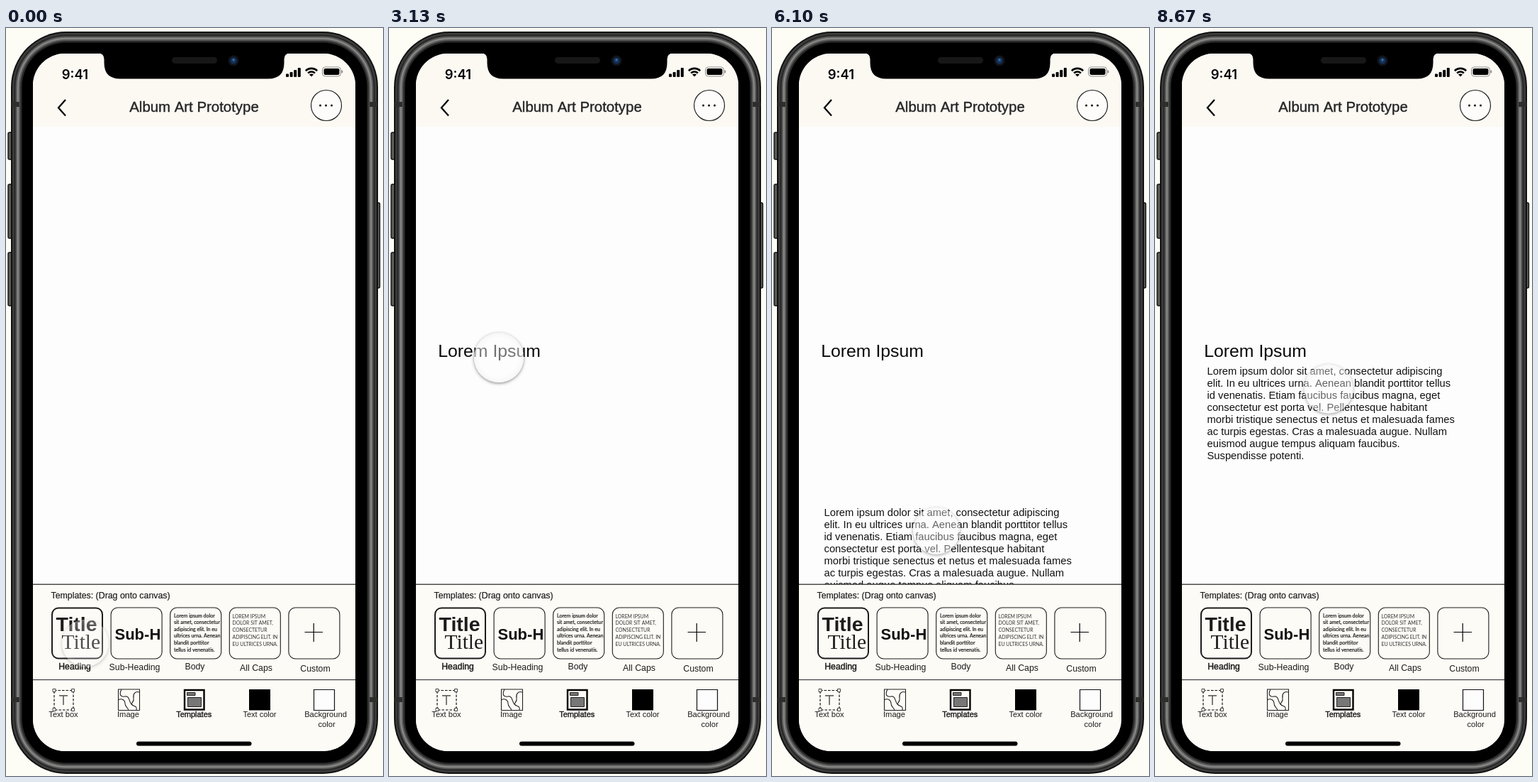
Write an HTML page with a canvas that moves like this. It is 532 by 1053 pixels and loops after 8710 ms.

```html
<!DOCTYPE html>
<html lang="en">
<head>
<meta charset="utf-8">
<title>Template drag</title>
<style>
  html, body { margin: 0; width: 100%; height: 100%; overflow: hidden; background: #fdfcf5; }
  canvas { display: block; width: 532px; height: 1053px; }
</style>
</head>
<body>
<canvas id="stage" width="532" height="1053"></canvas>
<script>
const ctx = document.getElementById('stage').getContext('2d');
const LOOP = 8710;
const SANS = '"Liberation Sans", Arial, sans-serif';
const SERIF = '"Liberation Serif", Times, serif';
const SMALL = 'Lato, sans-serif';
const CREAM = '#fdfbf6';
const INK = '#1c1c1c';
const HEADING_Y = 463;

// time, x, y, radius, offset from touch point to dragged baseline, strength
const TOUCH = [
  [0, 112, 866, 33, -5, 0.5],
  [450, 112, 866, 33, -5, 0.8],
  [1930, 157, 499, 33, -5, 1],
  [2600, 155, 464, 34, -1, 1],
  [3130, 155, 464, 35, -1, 1],
  [3350, 155, 464, 35, -1, 0.9],
  [4300, 271, 858, 34, -21, 0.6],
  [5100, 271, 858, 33.5, -21, 0.7],
  [6100, 232, 708, 33, -21, 0.8],
  [7000, 249, 527, 33.5, -22, 0.8],
  [7700, 245, 508, 34, -20, 0.8],
  [8710, 245, 508, 34.5, -20, 0.8]
];

const BODY = [
  'Lorem ipsum dolor sit amet, consectetur adipiscing',
  'elit. In eu ultrices urna. Aenean blandit porttitor tellus',
  'id venenatis. Etiam faucibus faucibus magna, eget',
  'consectetur est porta vel. Pellentesque habitant',
  'morbi tristique senectus et netus et malesuada fames',
  'ac turpis egestas. Cras a malesuada augue. Nullam',
  'euismod augue tempus aliquam faucibus.',
  'Suspendisse potenti.'
];

// Slope at a key; flat wherever the direction turns or rests
function slope(i, c) {
  const a = TOUCH[i - 1], b = TOUCH[i], d = TOUCH[i + 1];
  if (!a || !d) return 0;
  const s = (b[c] - a[c]) / (b[0] - a[0]);
  const e = (d[c] - b[c]) / (d[0] - b[0]);
  return s * e <= 0 ? 0 : 2 * s * e / (s + e);
}

function track(t, c) {
  let i = 0;
  while (i < TOUCH.length - 2 && t >= TOUCH[i + 1][0]) i++;
  const a = TOUCH[i], b = TOUCH[i + 1], h = b[0] - a[0];
  const u = (t - a[0]) / h, v = 1 - u;
  return (1 + 2 * u) * v * v * a[c] + u * v * v * h * slope(i, c)
       + u * u * (3 - 2 * u) * b[c] - u * u * v * h * slope(i + 1, c);
}

function rect(x, y, w, h, color) {
  ctx.fillStyle = color;
  ctx.fillRect(x, y, w, h);
}

function round(x, y, w, h, r, fill, stroke, width = 1) {
  ctx.beginPath();
  ctx.roundRect(x, y, w, h, r);
  if (fill) { ctx.fillStyle = fill; ctx.fill(); }
  if (stroke) { ctx.strokeStyle = stroke; ctx.lineWidth = width; ctx.stroke(); }
}

function disc(x, y, r, color) {
  ctx.beginPath();
  ctx.arc(x, y, r, 0, Math.PI * 2);
  ctx.fillStyle = color;
  ctx.fill();
}

function line(d, width, color = '#000') {
  ctx.strokeStyle = color;
  ctx.lineWidth = width;
  ctx.stroke(new Path2D(d));
}

function text(s, x, y, font, { color = INK, align = 'left', heavy = 0 } = {}) {
  ctx.font = font;
  ctx.textAlign = align;
  ctx.fillStyle = color;
  ctx.fillText(s, x, y);
  if (heavy) {
    ctx.strokeStyle = color;
    ctx.lineWidth = heavy;
    ctx.strokeText(s, x, y);
  }
}

function label(s, x, y, size, heavy = 0) {
  text(s, x, y, `${size}px ${SANS}`, { align: 'center', heavy });
}

function lines(list, x, y, step, font, style) {
  list.forEach((s, i) => text(s, x, y + i * step, font, style));
}

function drawPhone() {
  rect(0, 0, 532, 1053, '#fdfcf5');
  for (const [x, y, h] of [[3, 147, 38], [3, 220, 76], [3, 316, 75], [521.5, 246, 120]]) {
    round(x, y, 6, h, 2, '#5c5c58', '#111', 1.4);
  }
  const rings = [[0, '#101010'], [2, '#3c3c3c'], [4.5, '#262626'], [6.5, '#555554'],
                 [8.5, '#858584'], [11, '#5a5a5a'], [13, '#2c2c2c'], [15.5, '#000']];
  for (const [d, color] of rings) {
    round(7 + d, 5 + d, 518 - 2 * d, 1045 - 2 * d, 78 - d, color);
  }
  for (const y of [104, 942]) {
    rect(8, y, 11, 7, '#2e2e2d');
    rect(513, y, 11, 7, '#2e2e2d');
  }
  rect(237, 1048, 59, 2, '#111');
}

function drawNotch() {
  ctx.fillStyle = '#000';
  ctx.fill(new Path2D('M130 35 Q138.5 36 138.5 44 V49 Q138.5 71.5 161 71.5 H370 Q392.5 71.5 392.5 49 V44 Q392.5 36 401 35 Z'));
  round(234, 41, 64, 9, 4.5, '#171717');
  disc(321, 46, 7.5, '#10151c');
  disc(321, 46, 4.5, '#15315a');
  disc(321, 45, 1.7, '#3b6ba6');
}

function drawStatus() {
  text('9:41', 78.7, 72, '600 18.5px Inter, sans-serif', { color: '#000' });
  [4.5, 7, 10, 13].forEach((h, i) => round(395 + i * 5.6, 69 - h, 4, h, 1, '#000'));
  ctx.save();
  ctx.beginPath();
  ctx.moveTo(431, 68.5);
  ctx.arc(431, 68.5, 14, -Math.PI * 0.75, -Math.PI * 0.25);
  ctx.clip();
  disc(431, 68.5, 4, '#000');
  for (const r of [7, 11.6]) {
    ctx.beginPath();
    ctx.arc(431, 68.5, r, 0, Math.PI * 2);
    ctx.strokeStyle = '#000';
    ctx.lineWidth = 2.6;
    ctx.stroke();
  }
  ctx.restore();
  round(446.5, 55, 26, 13, 4, null, '#8c8c8a');
  round(448.5, 57, 22, 9, 2.3, '#000');
  round(473.5, 59.5, 1.8, 4, 1, '#8c8c8a');
}

function drawHeader() {
  rect(38, 36, 455, 103, '#fcf9f3');
  drawStatus();
  line('M84 101 L74 112.3 L84 123.6', 2.3);
  text('Album Art Prototype', 265.5, 118, `20.4px ${SANS}`, { align: 'center', heavy: 0.4, color: '#252525' });
  round(430.5, 87.5, 43, 43, 21.5, '#fdfcfa', '#222', 1.2);
  for (const x of [443.5, 451.5, 459.5]) disc(x, 109, 1.5, '#111');
}

function drawTemplates() {
  rect(38, 783, 455, 236, CREAM);
  rect(38, 782.6, 455, 1.2, '#222');
  rect(38, 917, 455, 1.1, '#333');
  text('Templates: (Drag onto canvas)', 63.5, 803, `12.35px ${SANS}`, { heavy: 0.2 });
  round(65, 816.5, 71, 71, 9, CREAM, INK, 2);
  for (let i = 1; i < 5; i++) {
    round(64.5 + i * 83.6, 816, 72, 72, 9.5, CREAM, INK, 1.1);
  }
  text('Title', 70.5, 848.5, `bold 28.5px ${SANS}`);
  text('Title', 78.5, 874, `29.5px ${SERIF}`);
  text('Sub-H', 153.5, 860.5, `bold 22px ${SANS}`, { color: '#111' });
  lines(['Lorem ipsum dolor', 'sit amet, consectetur', 'adipiscing elit. In eu',
         'ultrices urna. Aenean', 'blandit porttitor', 'tellus id venenatis.'],
        237, 829.5, 9.6, `7.1px ${SMALL}`, { heavy: 0.2 });
  lines(['LOREM IPSUM', 'DOLOR SIT AMET,', 'CONSECTETUR', 'ADIPISCING ELIT. IN', 'EU ULTRICES URNA.'],
        319.5, 830.5, 9.8, `6.9px ${SMALL}`, { color: '#333' });
  line('M421.5 850.5 H447 M434.2 838 V864', 1.2);
  label('Heading', 97, 903, 12.2, 0.45);
  label('Sub-Heading', 181.5, 903.5, 12.3);
  label('Body', 266.5, 903, 12.3);
  label('All Caps', 353, 904.5, 12.3);
  label('Custom', 436.5, 906, 12.3);
}

function drawToolbar() {
  ctx.setLineDash([3.5, 2]);
  line('M68 932.5 H95 V960 H68 Z', 1.1);
  ctx.setLineDash([]);
  for (const x of [66, 92.5]) {
    for (const y of [930.5, 957.5]) round(x, y, 4, 4, 0, CREAM, '#333', 0.9);
  }
  line('M75 939.8 H87 M81 939.8 V953', 1.7, '#666');

  round(158.5, 931, 30, 29.5, 0, null, '#222', 1.1);
  line('M163 931 C159 939 162 942 168 941 C175 940 173 948 177 952 C181 956 185 953 184 960.5', 1.1, '#222');
  line('M188 935 C182 933 179 938 180 943 C181 948 178 949 177 952 M158.5 946 C163 943 168 946 168 951 C168 956 172 956 173 960.5', 1.1, '#222');

  round(252, 932, 27.5, 27.5, 0, null, '#000', 2.4);
  round(255.5, 935.5, 11.5, 4, 0, '#777', '#222', 1);
  round(256.5, 942.5, 19, 13, 0, '#777', '#222', 1);

  rect(343, 931, 30, 29.5, '#000');
  round(434.5, 931.5, 29, 29, 0, '#fdfdfd', '#111', 1.2);

  label('Text box', 81, 970, 11.1);
  label('Image', 172.5, 970, 11.2);
  label('Templates', 265.2, 970, 11, 0.4);
  label('Text color', 358, 970, 11);
  label('Background', 451, 970, 11.2);
  label('color', 452.5, 984, 11.2);
  round(184, 1004.5, 162.5, 6, 3, '#000');
}

function drawTouch(t) {
  const x = track(t, 1), y = track(t, 2), r = track(t, 3), strength = track(t, 5);
  ctx.save();
  ctx.beginPath();
  ctx.rect(0, 0, 532, 1053);
  ctx.arc(x, y, r, 0, Math.PI * 2);
  ctx.clip('evenodd');
  ctx.shadowColor = `rgba(0,0,0,${0.45 * strength})`;
  ctx.shadowBlur = 4;
  ctx.shadowOffsetY = 1.3;
  disc(x, y, r, '#fff');
  ctx.restore();

  const glow = ctx.createRadialGradient(x, y, 0, x, y, r);
  glow.addColorStop(0, 'rgba(253,253,253,.42)');
  glow.addColorStop(0.75, 'rgba(253,253,253,.46)');
  glow.addColorStop(1, 'rgba(243,243,243,.7)');
  ctx.globalAlpha = strength;
  disc(x, y, r, glow);
  ctx.globalAlpha = 1;
}

function draw(t) {
  ctx.clearRect(0, 0, 532, 1053);
  drawPhone();
  ctx.save();
  ctx.beginPath();
  ctx.roundRect(38, 36, 455, 982, 45);
  ctx.clip();
  rect(38, 36, 455, 982, '#fdfdfd');
  drawHeader();
  const held = track(t, 2) + track(t, 4);
  text('Lorem Ipsum', 69.2, t < 3200 ? held : HEADING_Y, `24.8px ${SANS}`, { color: '#080808' });
  if (t > 4700) lines(BODY, 73.5, held, 17, `14.75px ${SANS}`, { color: '#111' });
  drawTemplates();
  drawToolbar();
  ctx.restore();
  drawNotch();
  drawTouch(t);
}

const start = performance.now();
function tick() {
  draw((performance.now() - start) % LOOP);
  requestAnimationFrame(tick);
}
tick();
</script>
</body>
</html>
```
